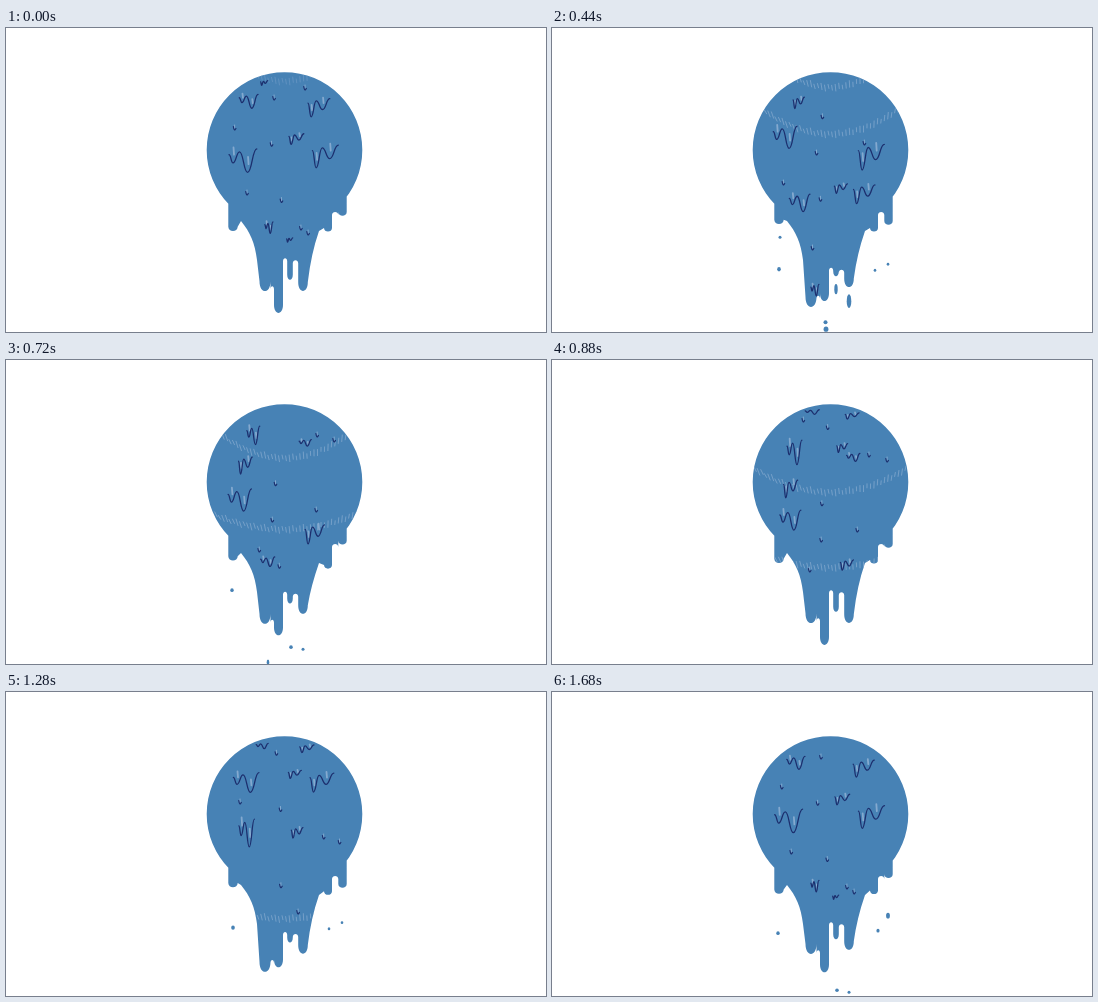
Animation, 540 px wide and 304 px high, one loop 1.72 s. Source, as an HTML page with a canvas:

```html
<!DOCTYPE html>
<html lang="en">
<head>
<meta charset="utf-8">
<title>Dripping ball</title>
<style>
html, body { margin: 0; width: 100%; height: 100%; overflow: hidden; background: #fff; }
canvas { display: block; width: 540px; height: 304px; }
</style>
</head>
<body>
<canvas id="stage" width="540" height="304"></canvas>
<script>
const ctx = document.getElementById('stage').getContext('2d');
const LOOP = 1720, STEP = 40, CYCLE = 880;
const BODY = '#4782b5', INK = '#1c2f6e', PALE = '#84a9cf';
const BALL = { x: 278.5, y: 122, r: 77.8 };

const lerp = (a, b, k) => a + (b - a) * k;
const wave = (p, peak) => Math.cos((p - peak) / CYCLE * 2 * Math.PI);

// Drip tips either swing, or grow until they shed a drop
const swing = (mid, amp, peak) => p => mid + amp * wave(p, peak);
const grow = (low, high, shed, period = CYCLE) => p =>
  lerp(low, high, (p - shed + CYCLE) % period / period);

const drips = [
  { x: 227, w: 4.7, tip: grow(195, 209, 380), valley: 193 },
  { x: 259, w: 5.5, tip: swing(271, 9, 370), valley: 263 },
  { x: 272.5, w: 4.5, tip: swing(279, 9, 120), valley: 235 },
  { x: 284, w: 2.8, tip: swing(250, 8, 190), valley: 237 },
  { x: 297, w: 4.8, tip: swing(261, 9, 190), valley: 203 },
  { x: 322, w: 4, tip: grow(201, 209, 300, CYCLE / 2), valley: 184 },
  { x: 336.5, w: 4.2, tip: grow(184, 202, 700) },
];

// Drops let go in bursts: x, y, radius, stretch
const bursts = {
  200: [[227, 208, 1.8, 1.2], [323, 209, 1.3, 1.2], [336, 203, 1.3, 1.1], [273, 288, 3.2, 1.2]],
  410: [[228, 205, 1.5, 1], [273.5, 290, 2, 1], [274, 297, 2.4, 1.1], [284, 257, 1.7, 3], [297, 269, 2.3, 3]],
  560: [[226, 208, 1.7, 1.1], [262, 280, 1.3, 2], [262, 292, 1.2, 1.3], [285, 265, 1.8, 1], [297, 267, 1.5, 1]],
  730: [[336, 214, 1.9, 1.5], [326, 229, 1.6, 1.2]],
};
const FALL = { life: 260, depth: 36 };

function bodyPath(p) {
  const path = new Path2D();
  path.moveTo(279, 130);
  path.lineTo(drips[0].x - drips[0].w, 165);
  drips.forEach(({ x, w, tip, valley }, i) => {
    const end = tip(p), central = i > 0 && i < 5;
    const h = w * (central ? 1.8 : 0.9), y = end - h;
    path.lineTo(x - w, y);
    path.bezierCurveTo(x - w, end + h / 3, x + w, end + h / 3, x + w, y);
    if (i === 0) {
      path.lineTo(235, valley);
      path.bezierCurveTo(244, 204, 249, 215, 251, 232);
    } else if (i === 4) {
      path.quadraticCurveTo(305, 226, 313, valley);
    } else if (valley) {
      const next = drips[i + 1];
      const top = valley + (central ? 5 * wave(p, 400) : 0);
      path.lineTo(x + w, top + 3);
      path.bezierCurveTo(x + w, top - 1, next.x - next.w, top - 1, next.x - next.w, top + 3);
    } else {
      path.lineTo(x + w, 165);
    }
  });
  path.closePath();
  const ball = new Path2D();
  ball.arc(BALL.x, BALL.y, BALL.r, 0, 2 * Math.PI, true);
  path.addPath(ball);
  return path;
}

function drawDrops(p) {
  for (const [born, drops] of Object.entries(bursts)) {
    const k = (p - born) / FALL.life;
    if (k < 0 || k >= 1) continue;
    for (const [x, y, r, stretch] of drops) {
      ctx.beginPath();
      ctx.ellipse(x, y + FALL.depth * k, r, r * stretch, 0, 0, 2 * Math.PI);
      ctx.fill();
    }
  }
}

// How wide the ball is at height y, relative to its middle
const spread = y => Math.max(0.4, Math.sqrt(Math.max(0, 1 - ((y - BALL.y) / BALL.r) ** 2)));
const around = (side, y) => BALL.x + side * spread(y);

// Squiggles slide over the ball; "deep" is the longer tooth
const marks = [
  { born: 1120, life: 1480, from: 52, to: 160, ease: 1.8, side: -46, w: 24, h: 23, deep: 3 },
  { born: 1120, life: 1480, from: 55, to: 205, ease: 2, side: 41, w: 26, h: 26, deep: 1 },
  { born: 1120, life: 1200, from: 79, to: 183, ease: 1.7, side: 12, w: 15, h: 11, deep: 1 },
  { born: 880, life: 1720, from: 52, to: 217, ease: 1, side: -42, w: 28, h: 24, deep: 3 },
  { born: 880, life: 1440, from: 56, to: 180, ease: 1, side: 41, w: 26, h: 23, deep: 1 },
  { born: 600, life: 1560, from: 65, to: 262, ease: 1.15, side: -39, w: 16, h: 29, deep: 3 },
  { born: 880, life: 840, from: 88, to: 212, ease: 1.15, side: 13, w: 12, h: 11, deep: 1 },
  { born: 600, life: 520, from: 72, to: 119, ease: 1, side: 24, w: 14, h: 9, deep: 3 },
  { born: 0, life: 1120, from: 55, to: 172, ease: 1.9, side: -40, w: 14, h: 18, deep: 1 },
];

// Small beads share one speed: birth and side
const beads = [[0, 34], [210, -9], [560, 59], [600, 41], [820, -4],
  [880, -45], [1270, -13], [1400, -52], [1640, -14]];
const BEAD = { top: 60, speed: 0.125, life: 1280 };

// Time since birth, or -1 when not on the ball
function age(t, born, life) {
  const a = (t - born + 2 * LOOP) % LOOP;
  return a < life + STEP ? a : -1;
}

function stroke(color, width, build) {
  ctx.strokeStyle = color;
  ctx.lineWidth = width;
  ctx.beginPath();
  build();
  ctx.stroke();
}

function drawMark(m, t) {
  const a = age(t, m.born, Math.min(m.life, LOOP - STEP));
  if (a < 0) return;
  const y = lerp(m.from, m.to, Math.min(1, a / m.life) ** m.ease);
  const w = m.w * Math.max(0.5, spread(y));
  const h = m.h * spread(y) ** (y < BALL.y ? 2 : 1);
  const left = around(m.side, y) - w / 2, top = y - h / 2;
  const pts = [0, 1, 2, 3, 4].map(i => {
    const depth = i % 2 ? (i === m.deep ? 1 : 0.6) : 0.25 - i * 0.06;
    return [left + w * (i / 4) ** 1.4, top + h * depth];
  });
  if (h > 6) stroke(PALE, 1.8, () => {
    for (const i of [1, 3]) {
      const [x, low] = pts[i];
      ctx.moveTo(x + 1, low - h * 0.35);
      ctx.lineTo(x + 0.5, low - h * 0.65);
    }
  });
  stroke(INK, 1.3, () => {
    ctx.moveTo(...pts[0]);
    for (let i = 1; i < pts.length; i++) {
      const [x0, y0] = pts[i - 1], [x1, y1] = pts[i], mid = (x0 + x1) / 2;
      ctx.bezierCurveTo(mid, y0, mid, y1, x1, y1);
    }
  });
}

function drawBead([born, side], t) {
  const a = age(t, born, BEAD.life);
  if (a < 0) return;
  const y = BEAD.top + BEAD.speed * a, x = around(side, y);
  stroke(PALE, 1, () => { ctx.moveTo(x, y - 3); ctx.lineTo(x, y); });
  stroke(INK, 1.2, () => {
    ctx.moveTo(x - 1.3, y - 1.5);
    ctx.quadraticCurveTo(x - 0.5, y + 4, x + 1.3, y + 0.5);
  });
}

// Stitched bands ease in at the top, then slide at a steady speed
const bandY = t => 49 + 28.8 * Math.log(1 + Math.exp((t - 220) / 120));

function drawBand(t) {
  const mid = bandY(t);
  if (t < 0 || mid > 268) return;
  const bend = Math.max(0.003, 0.0082 - 0.00005 * (mid - 50));
  ctx.globalAlpha = Math.min(0.85, (mid - 47) / 14);
  stroke(PALE, 0.9, () => {
    for (let x = 203, i = 0; x < 356; x += 3.5, i++) {
      const y = mid - bend * (x - BALL.x) ** 2 + Math.sin(i * 2.3);
      const h = 2.6 + Math.sin(i * 1.7) * 0.7, lean = (BALL.x - x) * 0.012;
      ctx.moveTo(x - lean - 0.4, y - h);
      ctx.lineTo(x + lean + 0.4, y + h);
    }
  });
  ctx.globalAlpha = 1;
}

function draw(t) {
  const p = t % CYCLE, shape = bodyPath(p);
  ctx.clearRect(0, 0, 540, 304);
  ctx.fillStyle = BODY;
  ctx.fill(shape);
  drawDrops(p);
  ctx.save();
  ctx.clip(shape);
  ctx.lineCap = ctx.lineJoin = 'round';
  for (const delay of [0, 320]) drawBand(t - delay);
  for (const m of marks) drawMark(m, t);
  for (const b of beads) drawBead(b, t);
  ctx.restore();
}

function tick() {
  const t = performance.now() % LOOP;
  draw(t < 2 * STEP ? 0 : Math.floor(t / STEP) * STEP);
  requestAnimationFrame(tick);
}
tick();
</script>
</body>
</html>
```
